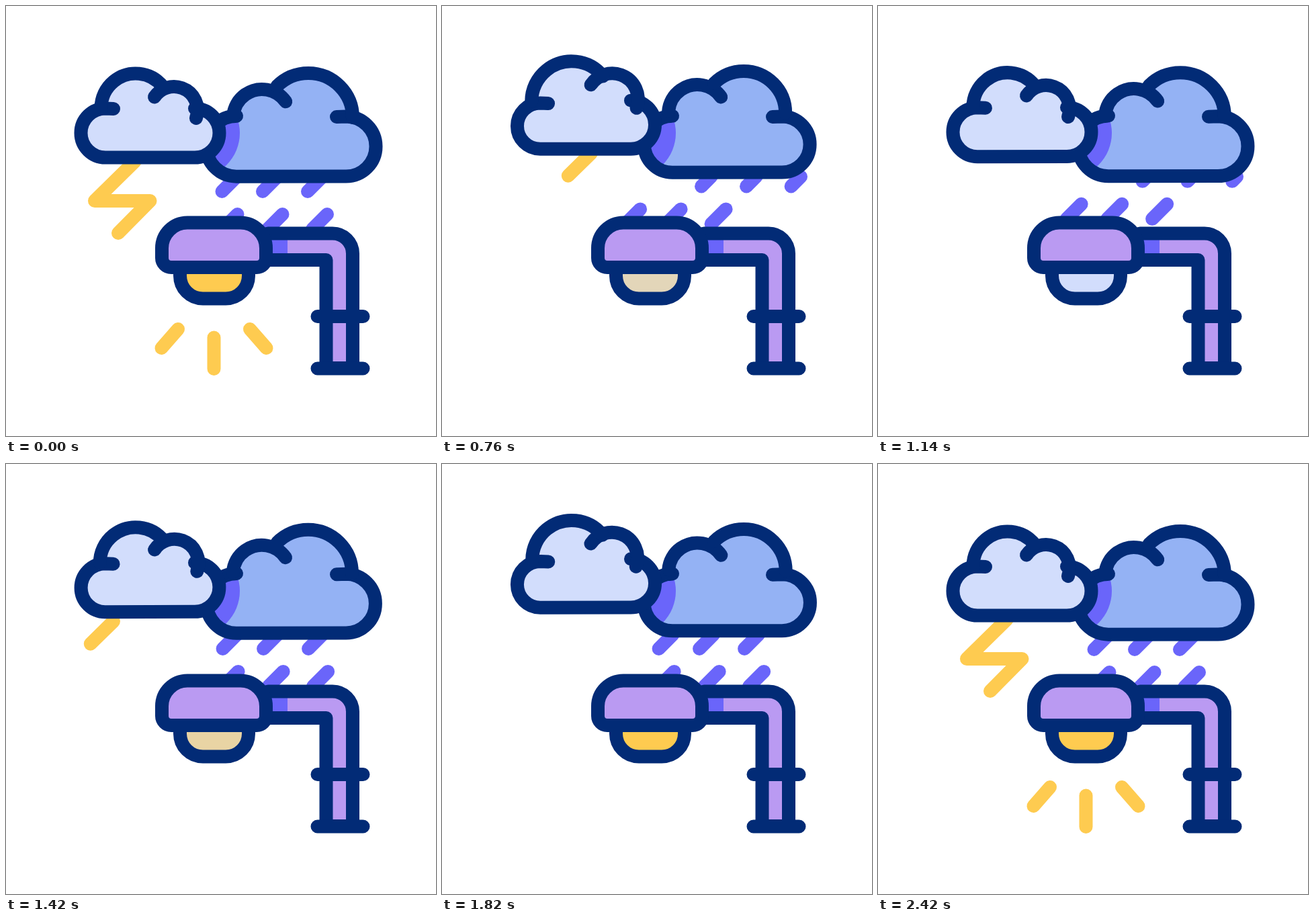
Write an HTML page with a canvas that moves like this. It is 640 by 640 pixels and loops after 2820 ms.

```html
<!DOCTYPE html>
<html lang="en">
<head>
<meta charset="utf-8">
<title>Street lamp in a storm</title>
<style>
html, body { margin: 0; width: 100%; height: 100%; overflow: hidden; background: #fff; }
canvas { display: block; }
</style>
</head>
<body>
<canvas id="stage" width="640" height="640"></canvas>
<script>
const ctx = document.getElementById('stage').getContext('2d');
const LOOP = 2820, START = 220, ACTIVE = 2000, TURN = 2 * Math.PI;
const DARK = '#022b76', PALE = '#d2ddfc', BLUE = '#94b2f4', VIOLET = '#6a65fa',
      LILAC = '#ba9af2', YELLOW = '#fecb50';

const mix = (a, b, k) => a + (b - a) * k;
const ramp = (t, from, to) => Math.max(0, Math.min(1, (t - from) / (to - from)));
const rad = deg => deg * Math.PI / 180;

// Strokes the part of a polyline between the fractions a and b.
function trim(points, a, b, color) {
  if (b <= a) return;
  let length = 0;
  points.forEach((p, i) => {
    if (i) length += Math.hypot(p[0] - points[i - 1][0], p[1] - points[i - 1][1]);
  });
  ctx.beginPath();
  points.forEach(p => ctx.lineTo(...p));
  ctx.setLineDash(a > 0 || b < 1 ? [(b - a) * length, 2 * length] : []);
  ctx.lineDashOffset = -a * length;
  ctx.strokeStyle = color;
  ctx.stroke();
  ctx.setLineDash([]);
}

function paint(d, fill) {
  const path = new Path2D(d);
  if (fill) {
    ctx.fillStyle = fill;
    ctx.fill(path);
  }
  ctx.strokeStyle = DARK;
  ctx.stroke(path);
}

// A lobe is a circle, its change when the cloud is raised, and the arc that is outlined.
const lobe = (x, y, r, [dx, dy, dr], from, to) => ({ x, y, r, dx, dy, dr, from, to });

// Tails extend the outline inwards on top of the left and right lobes.
const nearCloud = {
  left: lobe(148, 189, 36.5, [-2, -10.5, -2.5], -90, 90),
  right: lobe(281, 189, 36.5, [0, -12.5, -.5], 90, -90),
  middle: lobe(250, 155, 35, [3.5, -16.5, 3.5], 20, -146),
  big: lobe(193, 152, 51.5, [0, -10, 8.5], -39, 180),
  tails: [12, -4]
};
const farCloud = {
  left: lobe(343, 208.7, 45, [0, -3, -3], -90, 90),
  right: lobe(506, 209, 44.5, [0, -3, -3], 90, -90),
  middle: lobe(381, 167, 43, [-1, -7, 0], -35, 184),
  big: lobe(450, 166, 66, [-1, -7, -4], 0, 225),
  tails: [-5, 14]
};

// The lobes rise early and swell late.
function pose(l, lift) {
  const rise = lift ** .75, swell = lift ** 1.5;
  return { ...l, x: l.x + l.dx * swell, y: l.y + l.dy * rise, r: l.r + l.dr * swell };
}

function cloud(shape, lift, color, shaded) {
  const [left, right, middle, big] =
    [shape.left, shape.right, shape.middle, shape.big].map(l => pose(l, lift));
  const body = new Path2D();
  for (const { x, y, r } of [left, right, middle, big]) {
    body.moveTo(x + r, y);
    body.arc(x, y, r, 0, TURN);
  }
  body.rect(left.x, left.y - left.r, right.x - left.x, 2 * left.r);
  ctx.fillStyle = color;
  ctx.fill(body);
  if (shaded) {
    ctx.save();
    ctx.clip(body);
    ctx.beginPath();
    ctx.arc(281, 189, 67, 0, TURN);
    ctx.fillStyle = VIOLET;
    ctx.fill();
    ctx.restore();
  }

  const arc = l => ctx.arc(l.x, l.y, l.r, rad(l.from), rad(l.to), true);
  ctx.strokeStyle = DARK;
  ctx.beginPath();
  ctx.moveTo(left.x + shape.tails[0], left.y - left.r + .5);
  arc(left);
  arc(right);
  ctx.lineTo(right.x - shape.tails[1], right.y - right.r + .5);
  ctx.stroke();
  for (const l of [middle, big]) {
    ctx.beginPath();
    arc(l);
    ctx.stroke();
  }
}

// Each lane is a diagonal x + y = sum; the two rows are half a gap apart.
const RAIN_GAP = 112, RAIN_TOP = 254, DROP = 22;
const rainRows = [[597.5, 658, 725], [654.5, 721.5, 788]];

function rain(t) {
  const p = 5 * ramp(t, START + 5, START + 5 + ACTIVE);
  const fallen = p + .06 * (1 - Math.cos(TURN * p));
  rainRows.forEach((lanes, row) => {
    const end = 250 + (26 + RAIN_GAP * (fallen + row / 2)) % RAIN_GAP;
    const bottom = Math.max(RAIN_TOP + .1, end);
    const top = Math.max(RAIN_TOP, end - DROP);
    for (const sum of lanes) trim([[sum - bottom, bottom], [sum - top, top]], 0, 1, VIOLET);
  });
}

const bolt = (x, y, size) =>
  [[0, 0], [-60, 59], [22.5, 59], [-25, 107]].map(([dx, dy]) => [x + dx * size, y + dy * size]);
const mainBolt = bolt(192, 231, 1);

function flash(t, at, x, y, size) {
  const time = 200 * size;
  trim(bolt(x, y, size), ramp(t, at + 160, at + 160 + time), ramp(t, at, at + time), YELLOW);
}

function bolts(t) {
  if (t < 1000) trim(mainBolt, ramp(t, START, START + 200), 1, YELLOW);
  flash(t, 720, 222, 219, 1);
  flash(t, 1380, 160, 234, 1.15);
  trim(mainBolt, 0, ramp(t, 2040, 2240), YELLOW);
}

function rays(t) {
  const gone = t < 1000 ? ramp(t, START, 400) : 0;
  const grown = t < 1000 ? 1 : ramp(t, 2180, 2400);
  for (const side of [-1, 0, 1]) {
    const low = Math.abs(side);
    trim([[309.5 + 53.5 * side, 493.5 - 12.5 * low], [309.5 + 78 * side, 540 - 31 * low]],
      gone, grown, YELLOW);
  }
}

function lamp(t) {
  // Pole and arm
  const pole = 'M390 338.5H486A30 30 0 0 1 516 368.5V539H476.5V378H390';
  ctx.fillStyle = LILAC;
  ctx.fill(new Path2D(pole));
  ctx.fillStyle = VIOLET;
  ctx.fillRect(385, 340, 34, 36);
  paint(pole);
  paint('M463.5 462H531.5M463.5 539.5H531.5');

  // Glass and head
  const glow = Math.max(1 - ramp(t, START, 320), ramp(t, 720, 825) - ramp(t, 880, 1000), ramp(t, 1380, 1460));
  const glass = [[210, 254], [221, 203], [252, 80]].map(([a, b]) => Math.round(mix(a, b, glow)));
  paint('M259 389V401.5A34 34 0 0 0 293 435.5H327A34 34 0 0 0 361 401.5V389Z', `rgb(${glass})`);
  paint('M270 322.5H349A38 38 0 0 1 387 360.5V375A14 14 0 0 1 373 389H246A14 14 0 0 1 232 375V360.5A38 38 0 0 1 270 322.5Z', LILAC);
}

function draw(now) {
  const t = now % LOOP;
  const lift = (1 - Math.cos(2 * TURN * ramp(t, START, START + ACTIVE))) / 2;
  ctx.fillStyle = '#fff';
  ctx.fillRect(0, 0, 640, 640);
  ctx.lineWidth = 20;
  ctx.lineCap = ctx.lineJoin = 'round';
  rain(t);
  bolts(t);
  cloud(farCloud, lift, BLUE, true);
  cloud(nearCloud, lift, PALE);
  rays(t);
  lamp(t);
}

const begin = performance.now();
function tick() {
  draw(performance.now() - begin);
  requestAnimationFrame(tick);
}
tick();
</script>
</body>
</html>
```
